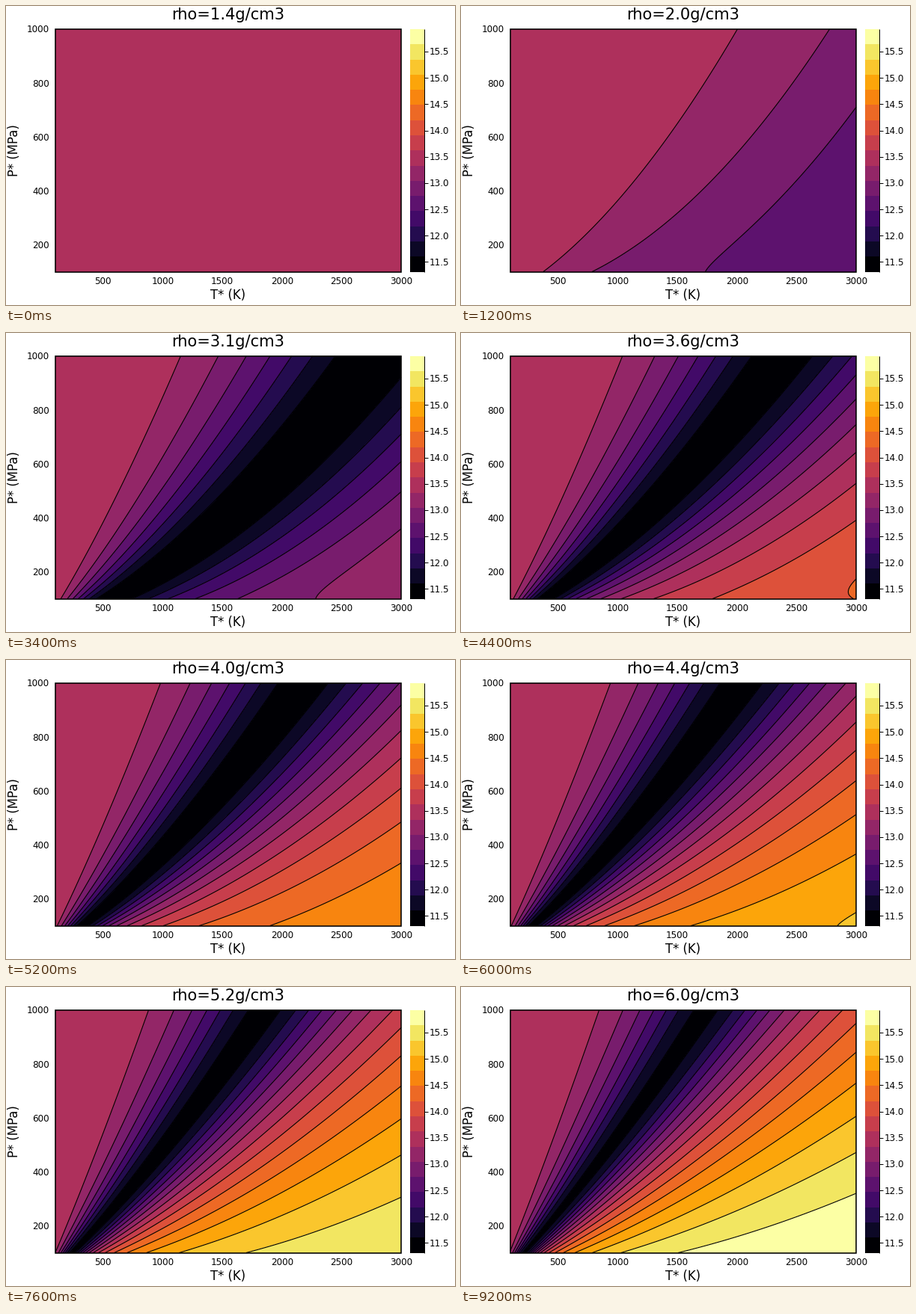
A matplotlib script that plays this animation: 600x400 px, repeating every 9.4 s.

```python
import numpy as np
import matplotlib.pyplot as plt
from matplotlib.animation import FuncAnimation
from matplotlib.patches import Rectangle

W, H, DPI = 600, 400, 100
PX = 72 / DPI  # points per pixel
FRAMES, STEP = 47, 200

# plot area and colour bar, in pixels
LEFT, RIGHT, TOP, BOTTOM = 66, 528, 31, 355.5
BAR_L, BAR_R = 540, 558.5

T_MIN, T_MAX, P_MIN, P_MAX = 100, 3000, 100, 1000
Z_MIN, Z_MAX, BANDS = 11.315, 15.926, 16
LEVELS = np.linspace(Z_MIN, Z_MAX, BANDS + 1)
COLORS = plt.get_cmap("inferno")(np.linspace(0, 1, BANDS))

DENSITY = 1.39      # fixed density of the material, g/cm3
TOTAL_SQ = 764700   # squared error of a zero prediction

plt.rcParams["font.family"] = "DejaVu Sans"


def x_px(t):
    return LEFT + (t - T_MIN) / (T_MAX - T_MIN) * (RIGHT - LEFT)


def y_px(p):
    return BOTTOM - (p - P_MIN) / (P_MAX - P_MIN) * (BOTTOM - TOP)


def bar_px(z):
    return BOTTOM - (z - Z_MIN) / (Z_MAX - Z_MIN) * (BOTTOM - TOP)


T, P = np.meshgrid(np.linspace(T_MIN, T_MAX, 200), np.linspace(P_MIN, P_MAX, 160))
GX, GY = x_px(T), y_px(P)


def log_error(rho):
    """Log of the squared misfit of a lattice-fluid style prediction."""
    y = DENSITY / rho
    log_free = np.log(1 - y)
    extra = (2.5 / rho) ** 3
    base = 9.045 + 7.05 * ((1 - 1 / y) * log_free - 1) - 0.108 * extra
    slope = 2.97 + 3.85 * (-log_free / y - 1)
    attraction = (0.107 + 0.008 * extra) / rho
    value = np.exp(base - slope * P / T + attraction * np.sqrt(P))
    floor = 286.4 + 8.75 * max(rho - 2.5, 0)
    best = np.sqrt(TOTAL_SQ - floor ** 2)
    return np.log((value - best) ** 2 + floor ** 2)


fig = plt.figure(figsize=(W / DPI, H / DPI), dpi=DPI, facecolor="white")
ax = fig.add_axes([0, 0, 1, 1])
ax.set_xlim(0, W)
ax.set_ylim(H, 0)
ax.axis("off")


def label(x, y, text, size, ha="center", **kw):
    return ax.text(x, y, text, fontsize=size * PX, ha=ha, va="baseline", **kw)


def line(xs, ys, width):
    ax.plot(xs, ys, color="black", lw=width * PX, zorder=5,
            solid_capstyle="butt")


title = label(297, 18.5, "", 21)
label(297, 392, "T* (K)", 16.5)
label(16, 193.5, "P* (MPa)", 16.5, rotation=90, rotation_mode="anchor")

for t in range(500, 3001, 500):
    label(x_px(t), 372.4, str(t), 12)
for p in range(200, 1001, 200):
    label(57.5, y_px(p) + 4.4, str(p), 12, ha="right")

edges = bar_px(LEVELS)
for low, high, color in zip(edges[:-1], edges[1:], COLORS):
    ax.add_patch(Rectangle((BAR_L, high), BAR_R - BAR_L, low - high,
                           facecolor=color, lw=0, antialiased=False))
line([BAR_R, BAR_R], [TOP, BOTTOM], 1)
for z in np.arange(11.5, 15.6, 0.5):
    line([BAR_R, BAR_R + 5.5], [bar_px(z)] * 2, 1)
    label(565.5, bar_px(z) + 4.4, f"{z:.1f}", 12, ha="left")

ax.add_patch(Rectangle((LEFT, TOP), RIGHT - LEFT, BOTTOM - TOP, fill=False,
                       ec="black", lw=1.6 * PX, zorder=6))

drawn = []


def update(i):
    while drawn:
        drawn.pop().remove()
    rho = 1.4 + 0.1 * i
    title.set_text(f"rho={rho:.1f}g/cm3")
    z = log_error(rho)
    drawn.append(ax.contourf(GX, GY, np.clip(z, Z_MIN + 1e-6, Z_MAX - 1e-6),
                             levels=LEVELS, colors=COLORS, zorder=2))
    inner = LEVELS[1:-1]
    inner = inner[(inner > z.min()) & (inner < z.max())]
    if len(inner):
        drawn.append(ax.contour(GX, GY, z, levels=inner, colors="black",
                                linewidths=1.1 * PX, zorder=3))
    return []


anim = FuncAnimation(fig, update, frames=FRAMES, interval=STEP,
                     init_func=lambda: [], repeat=True, repeat_delay=0)
plt.show()
```
